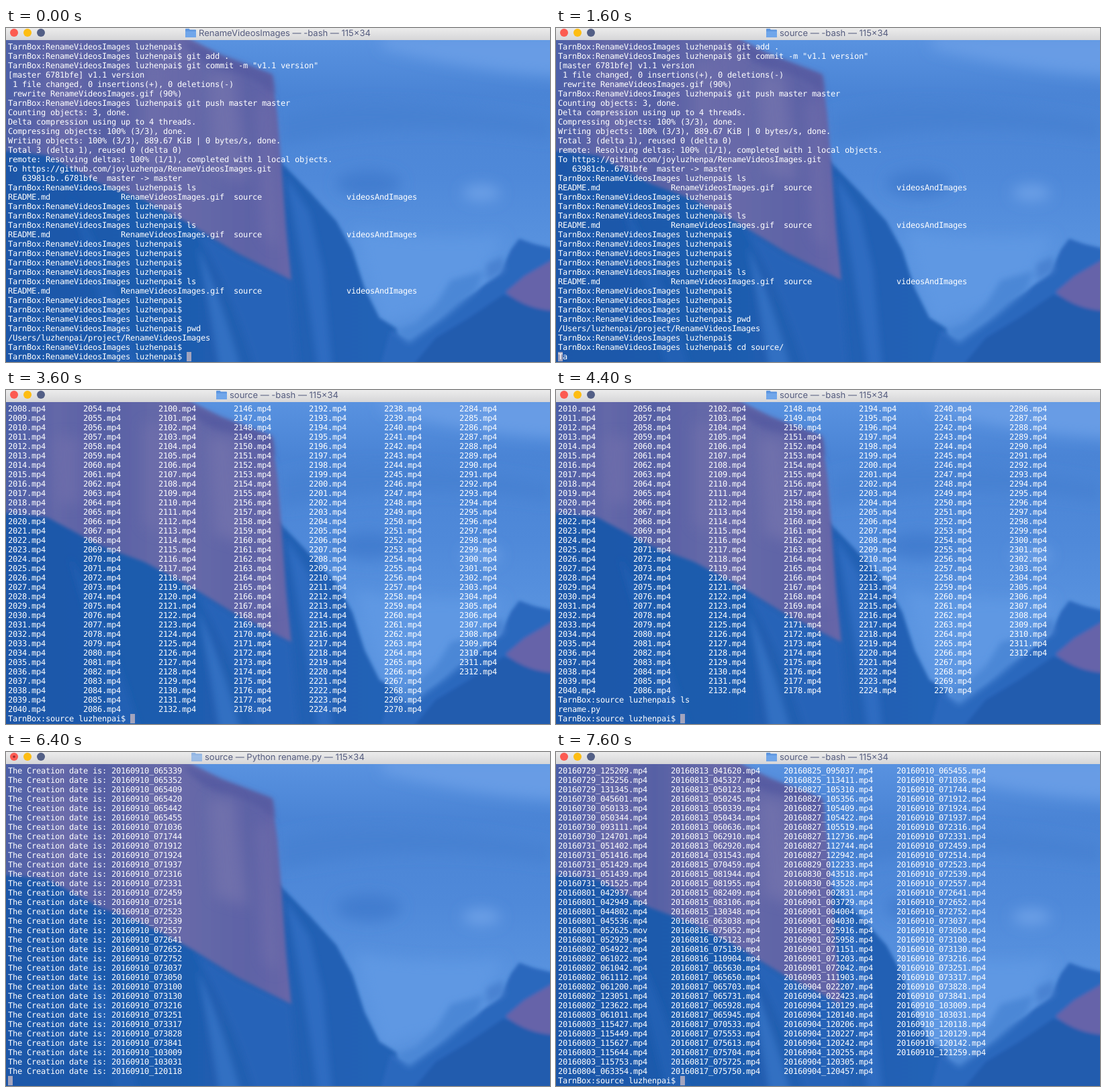
Write an HTML page that moves like this. It is 810 px wide and 498 px high and loops after 8000 ms.

```html
<!DOCTYPE html>
<html lang="en">
<head>
<meta charset="utf-8">
<title>Terminal</title>
<style>
html, body { margin: 0; width: 100%; height: 100%; overflow: hidden; background: #4a84d2; }
svg { display: block; width: 810px; height: 498px; }
text { white-space: pre; text-rendering: geometricPrecision; }
#rows text, #probe { font: 12px "DejaVu Sans Mono", monospace; fill: #fff; }
#title { font: 13px Inter, Roboto, sans-serif; fill: #545b7e; }
</style>
</head>
<body>
<svg viewBox="0 0 810 498" xmlns="http://www.w3.org/2000/svg">
  <defs>
    <linearGradient id="sky" x1="0" y1="0" x2="0" y2="1">
      <stop offset="0" stop-color="#5c95e2"/>
      <stop offset=".2" stop-color="#4a84d5"/>
      <stop offset=".45" stop-color="#4f89d9"/>
      <stop offset=".7" stop-color="#5a94e0"/>
      <stop offset="1" stop-color="#5790dc"/>
    </linearGradient>
    <linearGradient id="rock" x1="0" y1="0" x2="1" y2="0">
      <stop offset="0" stop-color="#4a60a8"/>
      <stop offset=".2" stop-color="#6467a8"/>
      <stop offset=".36" stop-color="#5761a5"/>
      <stop offset=".6" stop-color="#696aa9"/>
      <stop offset=".85" stop-color="#5d63a6"/>
      <stop offset="1" stop-color="#6866a8"/>
    </linearGradient>
    <linearGradient id="slope" x1="0" y1="0" x2="1" y2="0">
      <stop offset="0" stop-color="#1a57a8"/>
      <stop offset="1" stop-color="#2563b7"/>
    </linearGradient>
    <linearGradient id="bar" x1="0" y1="0" x2="0" y2="1">
      <stop offset="0" stop-color="#ececec"/>
      <stop offset="1" stop-color="#d6d6d8"/>
    </linearGradient>
    <filter id="soft" x="-20%" y="-20%" width="140%" height="140%"><feGaussianBlur stdDeviation="2.5"/></filter>
    <filter id="fold" x="-20%" y="-20%" width="140%" height="140%"><feGaussianBlur stdDeviation="5"/></filter>
    <filter id="haze" x="-40%" y="-40%" width="180%" height="180%"><feGaussianBlur stdDeviation="10"/></filter>
  </defs>

  <rect width="810" height="498" fill="url(#sky)"/>
  <g filter="url(#haze)">
    <path d="M560 10H830V72Q700 66 560 30Z" fill="#679ce5"/>
    <ellipse cx="540" cy="232" rx="48" ry="20" fill="#437dcf"/>
    <ellipse cx="708" cy="246" rx="28" ry="12" fill="#6da0e7"/>
    <path d="M410 130Q540 90 810 140V165Q600 130 410 175Z" fill="#4681d2"/>
    <path d="M520 300Q620 320 740 310L690 400 560 440Z" fill="#5f98e3"/>
  </g>
  <path d="M-10 180L400 190 414 205 452 244 492 288 516 332 534 388 556 432 582 448 600 510H-10Z" fill="url(#slope)" filter="url(#soft)"/>
  <g filter="url(#fold)">
    <path d="M280 298L345 340 424 375 436 510H372Q335 390 280 298Z" fill="#2763b8"/>
    <path d="M416 220L452 275 472 360 486 510H465Q440 330 416 220Z" fill="#2f6cc1"/>
    <path d="M95 250Q150 340 200 510H165Q130 360 95 250Z" fill="#2361b4"/>
    <path d="M285 325Q320 400 350 510H318Q300 400 285 325Z" fill="#336fc2"/>
  </g>
  <g filter="url(#soft)">
    <path d="M-10 10H262L322 42 396 70 404 130 410 205 417 300 425 376 345 336 270 290 205 256 140 232 62 190-10 182Z" fill="url(#rock)"/>
    <path d="M556 510L572 452 600 462 640 436 668 410 700 392 735 366 752 330 764 314 786 322 820 330V510Z" fill="#2b68bd"/>
    <path d="M600 510L640 462 690 432 740 398 820 418V510Z" fill="#205cae"/>
    <path d="M744 394L772 370 820 342V422Q775 420 744 394Z" fill="#6663a9"/>
  </g>
  <g filter="url(#fold)">
    <path d="M578 452L610 440 640 412 662 376 712 362 700 392 655 430 600 470Z" fill="#4c87d6"/>
    <path d="M715 352L740 340 742 362 716 376Z" fill="#4982d1"/>
    <path d="M262 18L322 42 396 70 400 100Q370 72 330 64T262 18Z" fill="#575ca2"/>
  </g>
  <g filter="url(#haze)" opacity=".7">
    <path d="M300 70H340L360 230 310 215Z" fill="#7674ae"/>
    <path d="M205 50H235V215L205 200Z" fill="#716fac"/>
    <path d="M70 70H110V170H75Z" fill="#706eac"/>
    <path d="M375 110H390L405 330 385 310Z" fill="#726fac"/>
  </g>

  <rect width="810" height="18" fill="url(#bar)"/>
  <circle cx="12" cy="7" r="6" fill="#fc5b51"/>
  <circle id="dot" cx="12" cy="7" r="1.8" fill="#8c2a2c"/>
  <circle cx="32" cy="7" r="6" fill="#fdbd13"/>
  <circle cx="52" cy="7" r="6" fill="#535f86"/>
  <g id="icon">
    <path d="M0 2Q0 1 1 1H5.5L7 2.6H15Q16 2.6 16 3.6V13Q16 14 15 14H1Q0 14 0 13Z" fill="#5d96e0"/>
    <path d="M0 5H16V13Q16 14 15 14H1Q0 14 0 13Z" fill="#70a6ea"/>
  </g>
  <text id="title" y="12"></text>

  <rect id="cursor" width="7" height="14" fill="#a3a4bd"/>
  <g id="rows"></g>
  <text id="probe" visibility="hidden">0000000000</text>
</svg>

<script>
const ROWS = 34, CELL = 7, LINE = 14, LEFT = 3, TOP = 21, STEP = 400;
const el = id => document.getElementById(id);

const USER = "luzhenpai", HOST = "TarnBox", REPO = "RenameVideosImages";
const prompt = dir => `${HOST}:${dir} ${USER}$ `;
const home = prompt(REPO), src = prompt("source");

const titles = {
  repo: { text: REPO + " — -bash — 115×34", x: 287 },
  bash: { text: "source — -bash — 115×34", x: 333 },
  run: { text: "source — Python rename.py — 115×34", x: 296, busy: true }
};

// Recording dates, one string per listing column: month+day, then times
const shots = [
  `0729 125209 125256 131345|0730 045601 050133 050344 093111 124701
  |0731 051402 051416 051429 051439 051525|0801 042937 042949 044802 045536 052625.mov 052929
  |0802 054922 061022 061042 061112 061200 123051 123622
  |0803 061011 115427 115449 115627 115644 115753|0804 063354`,
  `0813 041620 045327 050123 050245 050339 050434 060636 062910 062920|0814 031543
  |0815 070459 081944 081955 082409 083106 130348|0816 063038 075052 075123 075139 110904
  |0817 065630 065650 065703 065731 065928 065945 070533 075553 075613 075704 075725 075750`,
  `0825 095037 113411|0827 105310 105356 105409 105422 105519 112736 112744 122942
  |0829 012233|0830 043518 043528
  |0901 002831 003729 004004 004030 025916 025958 071151 071203 072042|0903 111903
  |0904 022207 022423 120129 120140 120206 120227 120242 120255 120305 120457`,
  `0910 065455 071036 071744 071912 071924 071937 072316 072331 072459 072514 072523
  072539 072557 072641 072652 072752 073037 073050 073100 073130 073216 073251 073317
  073828 073841 103009 103031 120118 120129 120142 121259`
].map(col => col.split("|").flatMap(part => {
  const [day, ...times] = part.trim().split(/\s+/);
  return times.map(t => `2016${day}_${t}`);
}));

const table = (n, cols, width, cell) => Array.from({ length: n }, (_, r) =>
  Array.from({ length: cols }, (_, c) => cell(r, c).padEnd(width)).join("").trimEnd());

const clips = table(46, 7, 16, (r, c) => {
  const id = 1995 + 46 * c + r;
  return id > 2312 ? "" : id + ".mp4";
});
const renamed = table(33, 4, 24, (r, c) => {
  const name = shots[c][r] || "";
  return !name || name.includes(".") ? name : name + ".mp4";
});
const dated = list => list.map(s => "The Creation date is: " + s.split(".")[0]);

const lines = [], screens = [];
const out = (...more) => lines.push(...more);
const snap = (title, text, col = text.length) =>
  screens.push({ title, col, rows: [...lines, text].slice(-ROWS) });

const listing = [home + "ls", "README.md".padEnd(24) + (REPO + ".gif").padEnd(24) +
  "source".padEnd(24) + "videosAndImages"];
const lsClips = "ls ../videosAndImages/";

out(home, home + "git add .", home + 'git commit -m "v1.1 version"',
  "[master 6781bfe] v1.1 version",
  " 1 file changed, 0 insertions(+), 0 deletions(-)",
  ` rewrite ${REPO}.gif (90%)`,
  home + "git push master master",
  "Counting objects: 3, done.",
  "Delta compression using up to 4 threads.",
  "Compressing objects: 100% (3/3), done.",
  "Writing objects: 100% (3/3), 889.67 KiB | 0 bytes/s, done.",
  "Total 3 (delta 1), reused 0 (delta 0)",
  "remote: Resolving deltas: 100% (1/1), completed with 1 local objects.",
  `To https://github.com/joyluzhenpa/${REPO}.git`,
  "   63981cb..6781bfe  master -> master",
  ...listing, home, home, ...listing, home, home, home, home, ...listing, home, home, home,
  home + "pwd", `/Users/${USER}/project/${REPO}`, home);

snap(titles.repo, home);
snap(titles.repo, home);
snap(titles.repo, home + "cd so");
snap(titles.repo, home + "cd source/");
out(home + "cd source/");
snap(titles.bash, HOST.slice(0, 2), 0);
snap(titles.bash, src + "ls");
out(src + "ls", "rename.py");
snap(titles.bash, src);
snap(titles.bash, src + lsClips.slice(0, 9));
snap(titles.bash, src + lsClips);
out(src + lsClips, ...clips);
snap(titles.bash, src);
snap(titles.bash, src + "l");
out(src + "ls", "rename.py");
snap(titles.bash, src);
snap(titles.bash, src + "pyth");
snap(titles.bash, src + "python3 rename.py");
out(src + "python3 rename.py");
snap(titles.run, "");
out(...dated(shots[2]));
snap(titles.run, "");
out(...dated(["065339", "065352", "065409", "065420", "065442"].map(t => "20160910_" + t)),
  ...dated(shots[3].slice(0, 28)));
snap(titles.run, "");
out(...dated(shots[3].slice(28)));
snap(titles.bash, src);
snap(titles.bash, src + lsClips);
out(src + lsClips, ...renamed);
snap(titles.bash, src);

// Fit the font's advance to the terminal cell
const spacing = CELL - el("probe").getComputedTextLength() / 10;
const rows = Array.from({ length: ROWS }, (_, r) => {
  const t = document.createElementNS("http://www.w3.org/2000/svg", "text");
  t.setAttribute("x", LEFT);
  t.setAttribute("y", TOP + LINE * r + 11);
  t.style.letterSpacing = spacing + "px";
  return el("rows").appendChild(t);
});

let shown = -1;
function draw(ms) {
  const i = Math.floor(ms / STEP) % screens.length;
  if (i === shown) return;
  shown = i;
  const s = screens[i];
  rows.forEach((t, r) => t.textContent = s.rows[r] || "");
  el("cursor").setAttribute("x", LEFT + CELL * s.col);
  el("cursor").setAttribute("y", TOP + LINE * (s.rows.length - 1));
  el("title").textContent = s.title.text;
  el("title").setAttribute("x", s.title.x);
  el("icon").setAttribute("transform", `translate(${s.title.x - 20} 0)`);
  el("icon").setAttribute("opacity", s.title.busy ? .6 : 1);
  el("dot").setAttribute("visibility", s.title.busy ? "visible" : "hidden");
}

const start = performance.now();
function tick() {
  draw(performance.now() - start);
  requestAnimationFrame(tick);
}
draw(0);
requestAnimationFrame(tick);
</script>
</body>
</html>
```
